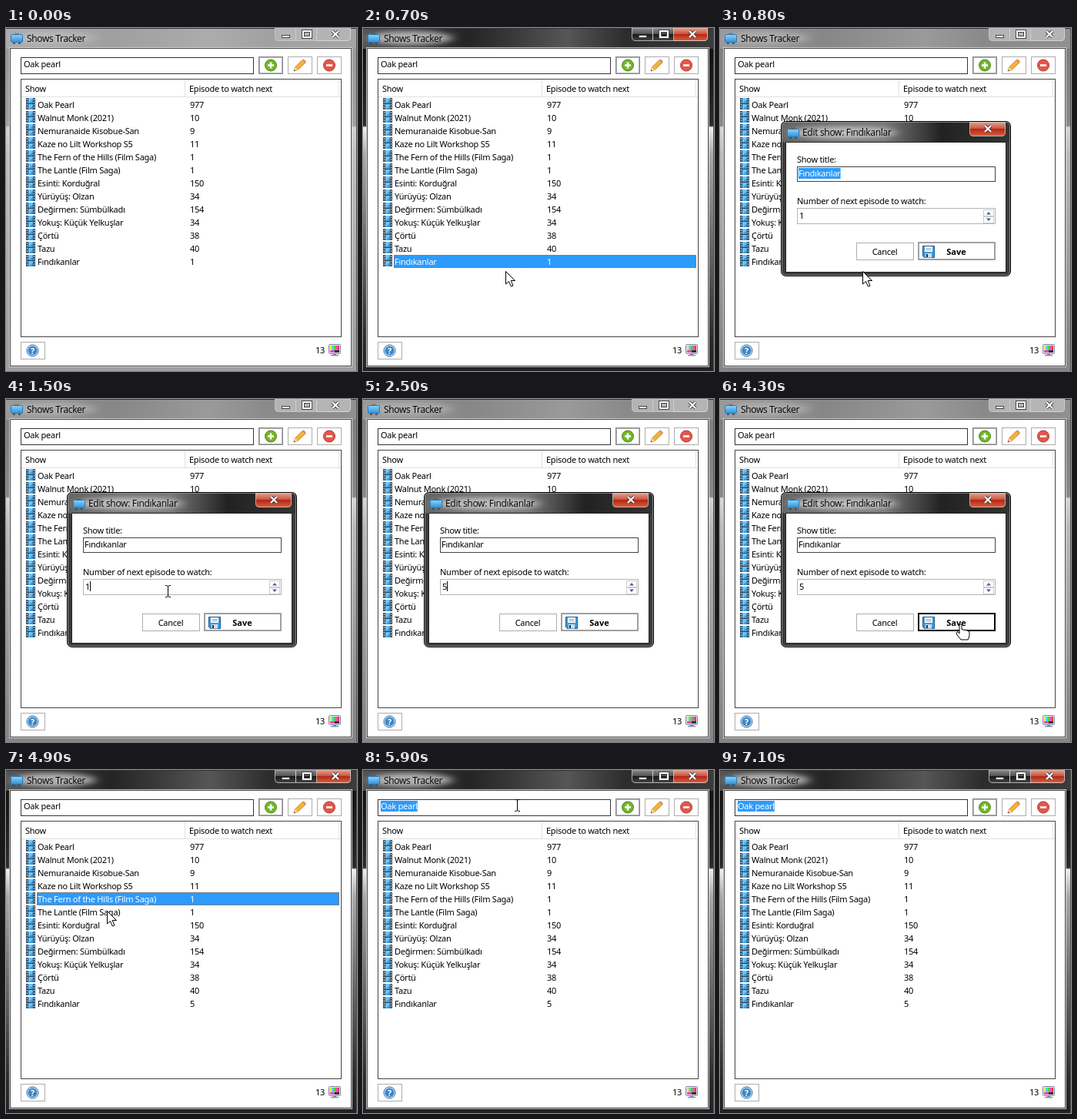
An HTML page that plays this animation: 456 px wide and 446 px high, repeating every 7200 ms.

```html
<!DOCTYPE html>
<html lang="en">
<head>
<meta charset="utf-8">
<title>Shows Tracker</title>
<style>
  html, body { margin: 0; width: 456px; height: 446px; overflow: hidden; }
  svg { display: block; }
  text { font: 11px "Noto Sans", "Open Sans", sans-serif; letter-spacing: -.25px; white-space: pre; }
  .caption { font: 12px "Open Sans", "Noto Sans", sans-serif; letter-spacing: -.3px; }
  .bold { font-weight: 700; letter-spacing: 0; }
  .mid { text-anchor: middle; }
  .light { fill: #fff; }
  .hidden { display: none; }
  .close { fill: url(#red); }
  .inactive .close { fill: #b4b4b4; }
  .inactive .box { fill: #b4b4b4; }
  .box { fill: url(#dark); }
  .inactive .glow { opacity: .45; }
</style>
</head>
<body>
<svg id="stage" width="456" height="446" viewBox="0 0 456 446"></svg>
<script>
const stage = document.getElementById('stage');
const BLUE = '#2d9bfb', LOOP = 7200, STEP = 100;
const shows = [
  ['Oak Pearl', 977], ['Walnut Monk (2021)', 10], ['Nemuranaide Kisobue-San', 9],
  ['Kaze no Lilt Workshop S5', 11], ['The Fern of the Hills (Film Saga)', 1],
  ['The Lantle (Film Saga)', 1], ['Esinti: Korduğral', 150], ['Yürüyüş: Olzan', 34],
  ['Değirmen: Sümbülkadı', 154], ['Yokuş: Küçük Yelkuşlar', 34], ['Çörtü', 38],
  ['Tazu', 40], ['Fındıkanlar', 1]
];
const FERN = 4, LAST = 12;

const text = (x, y, s, more = '') => `<text x="${x}" y="${y}" ${more}>${s}</text>`;
const rect = (x, y, w, h, fill, more = '') =>
  `<rect x="${x}" y="${y}" width="${w}" height="${h}" fill="${fill}" ${more}/>`;
const frame = (x, y, w, h, color, more = '') =>
  rect(x + .5, y + .5, w - 1, h - 1, '#fff', `stroke="${color}" ${more}`);
const path = (d, fill, more = '') => `<path d="${d}" fill="${fill}" ${more}/>`;
const use = (id, x, y) => `<use href="#${id}" x="${x}" y="${y}"/>`;
const gradient = (id, stops, flat) =>
  `<linearGradient id="${id}" x2="${flat ? 1 : 0}" y2="${flat ? 0 : 1}">` +
  stops.map(([at, c]) => `<stop offset="${at}" stop-color="${c}"/>`).join('') + '</linearGradient>';

const defs = `<defs>
  ${gradient('glass', [[0, '#0c0c0c'], [.2, '#222'], [.285, '#2c2c2c'], [.29, '#f0f0f0'], [.37, '#a8a8a8'], [.6, '#707070'], [.9, '#2c2c2c'], [1, '#222']])}
  ${gradient('bar', [[0, '#555'], [.3, '#242424'], [.42, '#383838'], [.58, '#565656'], [.75, '#2c2c2c'], [1, '#3c3c3c']], true)}
  ${gradient('dialogBar', [[0, '#666'], [.45, '#777'], [.7, '#222'], [1, '#333']], true)}
  ${gradient('red', [[0, '#e2a090'], [.45, '#cb5742'], [.5, '#b5261a'], [1, '#d8603a']])}
  ${gradient('dark', [[0, '#888'], [.45, '#555'], [.5, '#181818'], [1, '#444']])}
  ${gradient('sky', [[0, '#8fd2f8'], [1, '#2f90d8']])}
  <filter id="blur" x="-30%" y="-100%" width="160%" height="300%"><feGaussianBlur stdDeviation="7 3"/></filter>
  <g id="tv">
    ${path('M6 .5L8 2.5L10 .5', 'none', 'stroke="#345"')}
    ${rect(.5, 2.5, 15, 10, 'url(#sky)', 'rx="1" stroke="#2a77b4"')}
    ${path('M3 14H6M10 14H13', 'none', 'stroke="#345" stroke-width="1.5"')}
  </g>
  <g id="film">
    ${rect(0, 0, 12, 15, '#2c4558')}
    ${rect(3, 0, 6, 7, '#6fc2f4')}${rect(3, 8, 6, 7, '#6fc2f4')}
    ${path('M3 7L9 2V7ZM3 15L9 10V15Z', '#3c9fe0')}
    ${path('M1.5 1V15M10.5 1V15', 'none', 'stroke="#dce8f0" stroke-dasharray="2 1.4"')}
  </g>
  <g id="disk">
    ${path('M.5 .5H15.5V15.5H2.5L.5 13.5Z', '#3d9bdc', 'stroke="#17588c"')}
    ${rect(3, 1, 10, 7, '#f4f8fb')}${rect(4, 10, 8, 5.5, '#d5dde3')}${rect(5, 11, 2, 4, '#234')}
    ${path('M4.5 3.5H11.5M4.5 5.5H11.5', 'none', 'stroke="#9ab"')}
  </g>
  <g id="pencil">
    ${path('M0 16L1.5 11L11 1.5L15 5L5 14.5Z', '#f6b13c', 'stroke="#b87418" stroke-width=".8"')}
    ${path('M0 16L1.5 11L5 14.5Z', '#f4d9ae')}${path('M0 16L.6 14L2 15.4Z', '#333')}
    ${path('M11 1.5L12.5 .3L16 3.6L15 5Z', '#d98a80')}
  </g>
  <g id="screen">
    ${rect(.5, .5, 15, 12, '#e4e8f0', 'rx="1" stroke="#7b86a0"')}
    ${['#f4e43a', '#39d5e8', '#48d04a', '#e447cf', '#ec3b35'].map((c, i) => rect(2 + i * 2.4, 2, 2.4, 6, c)).join('')}
    ${rect(2, 8, 6, 3, '#e447cf')}${rect(8, 8, 6, 3, '#333')}
    ${rect(6, 13, 4, 1, '#889')}${rect(3, 14, 10, 1.5, '#8a93a8')}
  </g>
</defs>`;

const badge = (x, y, color, edge, mark) =>
  `<circle cx="${x}" cy="${y}" r="7.5" fill="${color}" stroke="${edge}"/>` +
  path(mark, 'none', 'stroke="#fff" stroke-width="2.6"');

const buttons = path('M349.5 0H447.5V12Q447.5 16.5 443 16.5H354Q349.5 16.5 349.5 12Z', '#777', 'class="box" stroke="#ccc" stroke-opacity=".8"')
  + path('M403.5 0H447.5V12Q447.5 16.5 443 16.5H403.5Z', '#777', 'class="close" stroke="#ddd" stroke-opacity=".7"')
  + path('M376.5 0V16', 'none', 'stroke="#ccc"')
  + rect(358.5, 9.5, 10, 3, '#fff', 'stroke="#444"')
  + path('M386 4H396V12H386Z', 'none', 'stroke="#444" stroke-width="4"')
  + path('M386 4H396V12H386Z', 'none', 'stroke="#fff" stroke-width="2"')
  + path('M424 4L432 12M432 4L424 12', 'none', 'stroke="#444" stroke-width="4"')
  + path('M424 4L432 12M432 4L424 12', 'none', 'stroke="#fff" stroke-width="2.2"');

const rows = shows.map(([name, episode], i) => {
  const y = 104 + 17 * i;
  return use('film', 26, y - 13) + `<g class="row">${text(41, y, name)}${text(239, y, episode)}</g>`;
}).join('');

const mainWindow = `<g id="main">
  ${rect(0, 0, 456, 446, 'url(#glass)')}${rect(0, 0, 456, 27, 'url(#bar)')}
  ${rect(0, 0, 456, 446, '#c8c8c8', 'id="veil"')}
  <ellipse class="glow" cx="62" cy="13" rx="54" ry="9" fill="#ccc" opacity=".8" filter="url(#blur)"/>
  ${path('M0 .5H456', 'none', 'stroke="#333"')}${path('M455.5 0V446', 'none', 'stroke="#555"')}
  ${use('tv', 6, 6)}${text(27, 18, 'Shows Tracker', 'class="caption"')}
  ${buttons}
  ${rect(4.5, 25.5, 445, 415, 'none', 'stroke="#ddd" stroke-opacity=".85"')}
  ${frame(5, 26, 444, 414, '#444')}
  ${frame(19, 38, 303, 22, '#333')}
  ${rect(23, 40, 0, 14, BLUE, 'id="searchMark"')}${text(23, 51, 'Oak pearl', 'id="search"')}
  ${frame(328, 37, 32, 23, '#8a8a8a')}${frame(329, 38, 30, 21, '#b0b0b0')}
  ${frame(366, 37, 32, 23, '#adadad')}${frame(404, 37, 32, 23, '#adadad')}
  ${badge(344, 48.5, '#73b52a', '#4d8614', 'M340 48.5H348M344 44.5V52.5')}
  ${use('pencil', 374, 40)}
  ${badge(420, 48.5, '#e2574c', '#b4372e', 'M416 48.5H424')}
  ${frame(19, 66, 417, 336, '#444')}
  ${text(25, 83, 'Show')}${text(238, 83, 'Episode to watch next')}
  ${path('M20 89.5H435M232.5 67V89M432.5 67V89', 'none', 'stroke="#e0e0e0"')}
  <g id="rowMark">
    ${rect(40, 0, 393, 17, BLUE)}
    ${rect(40.5, .5, 392, 16, 'none', 'stroke="#d26404" stroke-dasharray="1"')}
  </g>${rows}
  ${frame(19, 408, 32, 23, '#adadad')}
  ${badge(34.5, 419.5, '#dcebf7', '#2b6aa8', '')}<circle cx="34.5" cy="419.5" r="6" fill="#3b87c8"/>
  ${text(34.5, 423.5, '?', 'class="mid bold light"')}
  ${text(402, 423, '13')}${use('screen', 419, 411)}
</g>`;

const dialog = `<g id="dialog">
  ${rect(79.5, 121.5, 298, 201, '#3c3c3c', 'rx="6" stroke="#000"')}
  ${rect(80.5, 122.5, 296, 27, 'url(#dialogBar)', 'rx="5"')}
  ${rect(80.5, 122.5, 296, 199, 'none', 'rx="5" stroke="#aaa" stroke-opacity=".7"')}
  <ellipse cx="160" cy="136" rx="70" ry="8" fill="#ddd" opacity=".7" filter="url(#blur)"/>
  ${use('tv', 87, 129)}${text(107, 140, 'Edit show: ' + shows[LAST][0], 'class="caption"')}
  ${path('M324.5 122.5H370.5V136Q370.5 140.5 366 140.5H329Q324.5 140.5 324.5 136Z', '#777', 'class="close" stroke="#ddd" stroke-opacity=".7"')}
  ${path('M344 127L352 135M352 127L344 135', 'none', 'stroke="#533" stroke-width="4"')}
  ${path('M344 127L352 135M352 127L344 135', 'none', 'stroke="#fff" stroke-width="2.2"')}
  ${frame(85, 148, 287, 170, '#222')}
  ${text(100, 175, 'Show title:')}${frame(100, 180, 258, 20, '#444')}
  ${rect(102, 182, 0, 14, BLUE, 'id="titleMark"')}${text(102, 193, shows[LAST][0], 'id="titleText"')}
  ${text(100, 229, 'Number of next episode to watch:')}${frame(100, 234, 258, 21, '#b5b5b5')}
  ${text(103, 248, '1', 'id="number"')}${rect(109, 237, 1, 13, '#000', 'id="caret"')}
  ${frame(342, 236, 14, 9, '#ccc')}${frame(342, 245, 14, 9, '#ccc')}
  ${path('M346 242.5L349 239L352 242.5ZM346 247.5L349 251L352 247.5Z', '#4a628e')}
  ${frame(177, 279, 75, 23, '#adadad')}${text(214, 295, 'Cancel', 'class="mid"')}
  ${frame(257, 278, 101, 24, '#a0a0a0', 'class="save"')}${frame(258, 279, 99, 22, '#a0a0a0', 'class="save"')}
  ${use('disk', 263, 283)}${text(307, 295, 'Save', 'class="mid bold"')}
</g>`;

const ink = 'stroke="#000" stroke-linejoin="round"';
const pointers = `<g id="pointer">
  ${path('M-.5 .5V17L3.5 13.5L6.3 20L9 19L6.2 12.5H11.5Z', '#fff', ink + ' id="arrow"')}
  ${path('M-3 -7.5H-1L.5 -6.5L2 -7.5H4M.5 -6.5V6.5M-3 7.5H-1L.5 6.5L2 7.5H4', 'none', ink + ' id="beam"')}
  ${path('M-2 10V1.5Q-2 0 -.5 0T1 1.5V6.5L8 8Q11 8.5 11 11V14Q11 17 9 20H0L-5.5 13Q-6.5 11 -5 10T-2 12Z', '#fff', ink + ' id="hand"')}
</g>`;

stage.innerHTML = defs + mainWindow + dialog + pointers;

const $ = id => document.getElementById(id);
const rowGroups = [...document.querySelectorAll('.row')];
const saveEdges = document.querySelectorAll('.save');
const lastEpisode = rowGroups[LAST].lastChild;
const show = (id, on) => $(id).classList.toggle('hidden', !on);

// Each stroke of the pointer: time, x, y
const strokes = [
  [[100, 262, 440], [500, 186, 316], [900, 186, 316], [1300, 210, 250], [1600, 210, 250], [2300, 460, 330]],
  [[3400, 394, 262], [3800, 313, 292], [4300, 313, 293], [4800, 132, 183], [5100, 132, 183],
   [5300, 110, 140], [5500, 145, 85], [5700, 190, 56], [5900, 200, 46], [6200, 225, -22]]
];

function pointerAt(t) {
  for (const keys of strokes) {
    const i = keys.findIndex(([time]) => time > t);
    if (i < 1) continue;
    const [t0, x0, y0] = keys[i - 1], [t1, x1, y1] = keys[i];
    const k = (t - t0) / (t1 - t0), e = k * k * (3 - 2 * k);
    return [x0 + (x1 - x0) * e, y0 + (y1 - y0) * e];
  }
}

function mark(markId, textId, on) {
  $(markId).setAttribute('width', on ? $(textId).getComputedTextLength() : 0);
  $(textId).classList.toggle('light', on);
}

function draw(now) {
  const t = Math.floor(now % LOOP / STEP) * STEP;
  const within = (a, b) => t >= a && t < b;
  const dialogOpen = within(800, 4500);

  const inactive = t < 500 || within(800, 4400);
  $('main').classList.toggle('inactive', inactive);
  $('veil').setAttribute('opacity', t < 500 ? .75 : inactive ? .6 : 0);

  const selected = within(500, 800) ? LAST : within(4800, 5900) ? FERN : -1;
  show('rowMark', selected >= 0);
  $('rowMark').setAttribute('transform', `translate(0 ${95 - 4 + 17 * selected})`);
  rowGroups.forEach((row, i) => row.setAttribute('fill', i === selected ? '#fff' : '#000'));
  lastEpisode.textContent = t < 4400 ? 1 : 5;
  mark('searchMark', 'search', within(4500, 4800) || t >= 5900);

  show('dialog', dialogOpen);
  $('dialog').setAttribute('opacity', t >= 4400 ? .4 : 1);
  if (dialogOpen) mark('titleMark', 'titleText', t < 1300);
  $('number').textContent = t < 2500 ? 1 : 5;
  show('caret', within(1300, 2000) || within(2500, 3000) || within(3500, 4000));
  saveEdges.forEach(edge => edge.setAttribute('stroke', t >= 4000 ? '#000' : '#a0a0a0'));

  const at = pointerAt(t);
  show('pointer', at);
  if (at) $('pointer').setAttribute('transform', `translate(${at.map(Math.round)})`);
  const shape = within(1300, 1900) || within(5900, 6000) ? 'beam' : within(3700, 4400) ? 'hand' : 'arrow';
  for (const id of ['arrow', 'beam', 'hand']) show(id, id === shape);

  requestAnimationFrame(draw);
}
requestAnimationFrame(draw);
</script>
</body>
</html>
```
